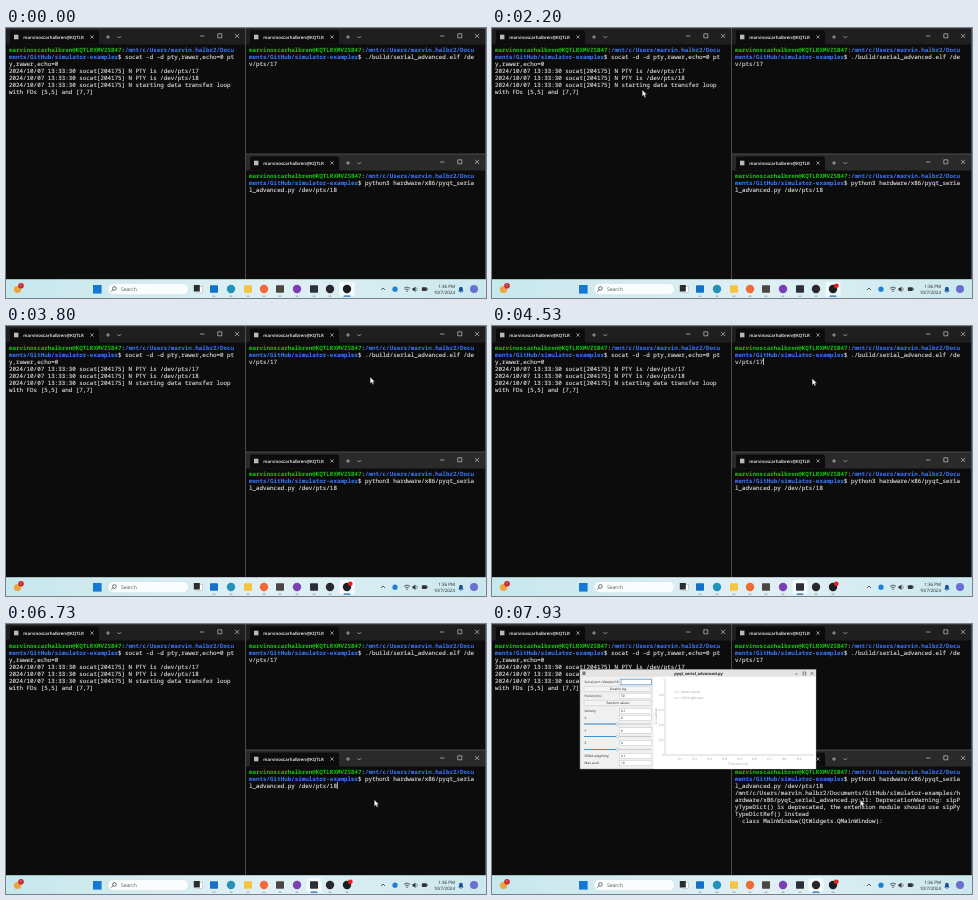
An HTML page that plays this animation: 480x270 px, repeating every 8 s.

```html
<!DOCTYPE html>
<html>
<head>
<meta charset="utf-8">
<style>
html, body { margin: 0; width: 100%; height: 100%; overflow: hidden; background: #0c0c0c; }
svg { display: block; width: 100vw; height: 100vh; }
text { white-space: pre; text-rendering: geometricPrecision; font-family: "Open Sans", sans-serif; }
.term { font: 500 5.86px "Noto Sans Mono", monospace; fill: #dedede; stroke: #dedede; stroke-width: .12; }
.user, .path { font-weight: 700; stroke: none; }
.user { fill: #16c60c; }
.path { fill: #3b78ff; }
.line { fill: none; stroke: #ddd; stroke-width: .6; }
</style>
</head>
<body>
<svg id="stage" viewBox="0 0 480 270"></svg>
<script>
const LOOP = 8000, CHAR = 3.516, ROW = 7;
const USER = 'marvinoscarhalbren@KQTLRXMVZSB47';
const HOME = '/mnt/c/Users/marvin.halbr2/Docu';

const rect = (x, y, w, h, fill, more = '') =>
  `<rect x="${x}" y="${y}" width="${w}" height="${h}" fill="${fill}" ${more}/>`;
const circle = (x, y, r, fill, more = '') =>
  `<circle cx="${x}" cy="${y}" r="${r}" fill="${fill}" ${more}/>`;
const label = (x, y, size, fill, str, more = '') =>
  `<text x="${x}" y="${y}" font-size="${size}" fill="${fill}" ${more}>${str}</text>`;
const stroke = (d, color, width = .6) =>
  `<path d="${d}" fill="none" stroke="${color}" stroke-width="${width}"/>`;
const group = (id, body) => `<g id="${id}">${body}</g>`;
const span = (cls, str) => `<tspan class="${cls}">${str}</tspan>`;

const rows = (lines, first = 0) => lines.map((line, i) =>
  `<text class="term" x="3" y="${23.7 + ROW * (first + i)}">${line}</text>`).join('');

const prompt = command => [
  span('user', USER) + ':' + span('path', HOME),
  span('path', 'ments/GitHub/simulator-examples') + '$ ' + command];

function terminal(x, y, height, barColor, lines, extra = '') {
  return `<g transform="translate(${x} ${y})">
    ${rect(0, 0, 240, height, '#0c0c0c')}
    ${rect(0, 0, 240, 16.5, barColor)}
    <path d="M2 16.5Q4 16.5 4 14.5V4.5Q4 2.5 6 2.5H91Q93 2.5 93 4.5V14.5Q93 16.5 95 16.5Z" fill="#0c0c0c"/>
    ${rect(8, 6.7, 4.4, 4.6, '#bbb')}
    ${label(17.3, 10.8, 4.4, '#fff', 'marvinoscarhalbren@KQTLR', 'font-weight="600"')}
    <path class="line" d="M84.4 7.4l3.2 3.2m0-3.2l-3.2 3.2M100 9h4m-2-2v4M111.5 8.2l1.8 1.8 1.8-1.8
      M194 8h4.4M211.8 5.8h4v4h-4zM229 5.8l4.2 4.2m0-4.2l-4.2 4.2"/>
    ${rows(lines)}${extra}
    ${stroke(`M0 0H240M239.5 0V${height}`, '#5a5a5a', .8)}
  </g>`;
}

function taskbar() {
  const apps = [[208, '#1272c9', 1], [225, '#2292b8'], [242, '#f5c542', 1], [258, '#f26a35'],
    [274, '#4a4642', 1], [291, '#7a3fb5'], [308, '#2b3036', 1], [324, '#29272a'], [341, '#1d1c20']];
  const appIcon = ([x, color, square]) =>
    (square ? rect(x - 4, 257.2, 8, 7.6, color, 'rx=".8"') : circle(x, 261, 4.2, color)) +
    rect(x - 1.5, 267.7, 3, .9, '#7e8b92', 'rx=".4"');
  const active = (id, x) => group(id,
    rect(x - 7.5, 254, 15, 14.5, '#f3fafc', 'rx="2"') +
    rect(x - 3.5, 267.6, 7, 1.2, '#0a70c4', 'rx=".6"'));
  return `<linearGradient id="sky">
      <stop stop-color="#c6e7ec"/><stop offset=".55" stop-color="#e0f0f5"/><stop offset="1" stop-color="#cbe8ee"/>
    </linearGradient>` +
    rect(0, 251.2, 480, 18.8, 'url(#sky)') +
    circle(11.5, 261.5, 3.6, '#eda43c') + circle(15, 257.8, 2.8, '#c8242c') +
    label(15, 259.4, 4, '#fff', '1', 'text-anchor="middle"') +
    rect(87, 257, 8.6, 8.6, '#1479d4') +
    rect(102, 255.5, 80.5, 11.2, '#fafdfe', 'rx="5.6" stroke="#c3d3da" stroke-width=".4"') +
    circle(108.4, 260.4, 1.8, 'none', 'stroke="#333" stroke-width=".7"') +
    stroke('M107 261.8l-1.8 1.8', '#333', .7) + label(115, 262.8, 5, '#555', 'Search') +
    rect(190, 258.5, 6.5, 6, '#fff', 'stroke="#999" stroke-width=".4"') + rect(187.8, 257, 6, 6.5, '#2c2c2c') +
    active('atRecorder', 341) + active('atTerminal', 308) + active('atLinux', 324) +
    apps.map(appIcon).join('') +
    circle(344.3, 257.8, 2.4, '#e02424', 'id="recording"') +
    stroke('M375 262l2 -2 2 2', '#222', .7) + circle(389, 261.2, 2.6, '#1b7fd6') +
    stroke('M398 260.3q3-2.6 6 0M399.3 261.8q1.7-1.4 3.4 0', '#222', .7) + circle(401, 263.2, .6, '#222') +
    '<path d="M406.5 260h1.3l1.7-1.5v5.4l-1.7-1.5h-1.3z" fill="#333"/>' +
    stroke('M410.6 259.6q1.3 1.6 0 3.2', '#333', .5) +
    rect(415.8, 259.3, 5, 3.6, '#333', 'rx=".7"') + rect(421, 260.3, .7, 1.6, '#333') +
    label(449, 259.6, 4.5, '#222', '1:36 PM', 'text-anchor="end"') +
    label(449, 266, 4.5, '#222', '10/7/2024', 'text-anchor="end"') +
    '<path d="M452.2 263.4l.9-1.4v-1.5a1.8 1.8 0 0 1 3.6 0v1.5l.9 1.4zM454 264h1.8l-.9.9z" fill="#174f9c"/>' +
    circle(468, 261, 4, '#6b6fd0');
}

function plotWindow() {
  const field = (y, name, value) => label(92.5, y + 1.1, 3.2, '#222', name) +
    rect(127.5, y - 2.8, 32, 5.6, '#fff', 'stroke="#b5b5b5" stroke-width=".4"') +
    label(129, y + 1.1, 3.2, '#222', value);
  const button = (y, name) =>
    rect(92, y - 2.7, 67.5, 5.4, '#f4f4f4', 'stroke="#b5b5b5" stroke-width=".4" rx=".6"') +
    label(126, y + 1.1, 3.2, '#222', name, 'text-anchor="middle"');
  const slider = y => rect(92, y - .6, 67.5, 1.2, '#c9c9c9', 'rx=".6"') +
    rect(92, y - .6, 33, 1.2, '#3a94d6', 'rx=".6"') + circle(125.5, y, 1.5, '#f8f8f8', 'stroke="#999" stroke-width=".4"');
  const gray = '#969696';
  const ticks = Array.from({ length: 9 }, (_, i) =>
    label(173 + 14.9 * (i + 1), 136.2, 3.2, gray, `0.${i + 1}`, 'text-anchor="middle"')).join('') +
    [0, 0.2, 0.4, 0.6, 0.8, 1].map(v =>
      label(171.5, 132 - 75 * v, 3.2, gray, v, 'text-anchor="end"')).join('');
  return rect(88, 45.5, 236, 99.5, '#f0f0f0', 'stroke="#8a8a8a" stroke-width=".5"') +
    rect(88.3, 45.8, 235.4, 7, '#e4e4e4') + rect(90.5, 47.5, 3, 3.6, '#777') +
    label(206.5, 50.8, 4, '#222', 'pyqt_serial_advanced.py', 'text-anchor="middle" font-weight="700"') +
    stroke('M303 50h2.6M311 48h2.8v2.8h-2.8zM318.6 48l2.8 2.8m0-2.8l-2.8 2.8', '#333', .5) +
    rect(161.5, 52.8, 162.2, 92, '#fff') +
    field(58, 'Serial port: /dev/pts/18', '') +
    rect(129, 55.2, 30.5, 5.6, '#fff', 'stroke="#3584c8" stroke-width=".6"') +
    button(65, 'Disable log') + field(72, 'Period (ms)', '50') + button(79, 'Random values') +
    field(87, 'Velocity', '0.1') + field(94, 'X', '0') + slider(100) +
    field(106.5, 'Y', '0') + slider(112.5) + field(119, 'Z', '0') + slider(125.5) +
    field(132, 'DSMA weighting', '0.1') + field(139, 'Max accel', '10') +
    stroke('M173 55V131H322', gray, .4) + ticks +
    stroke('M182 68h5', '#d99a9a', .5) + stroke('M182 74h5', '#9aa8d9', .5) +
    label(189, 69.1, 3.2, gray, 'Motor speed') + label(189, 75.1, 3.2, gray, 'LED brightness') +
    label(246, 141, 3.2, gray, 'Time (est ms)', 'text-anchor="middle"') +
    label(0, 0, 3.2, gray, 'G readings', 'text-anchor="middle" transform="translate(165 92) rotate(-90)"');
}

const warning = [
  HOME + 'ments/GitHub/simulator-examples/h',
  'ardware/x86/pyqt_serial_advanced.py:11: DeprecationWarning: sipP',
  'yTypeDict() is deprecated, the extension module should use sipPy',
  'TypeDictRef() instead',
  '  class MainWindow(QtWidgets.QMainWindow):'];

const stage = document.getElementById('stage');
stage.innerHTML =
  terminal(0, 0, 251.5, '#1f1f1f', [...prompt('socat -d -d pty,rawer,echo=0 pt'), 'y,rawer,echo=0',
    '2024/10/07 13:33:30 socat[204175] N PTY is /dev/pts/17',
    '2024/10/07 13:33:30 socat[204175] N PTY is /dev/pts/18',
    '2024/10/07 13:33:30 socat[204175] N starting data transfer loop',
    'with FDs [5,5] and [7,7]']) +
  terminal(240, 0, 126, '#1f1f1f', [...prompt('./build/serial_advanced.elf /de'), 'v/pts/17']) +
  terminal(240, 126, 125.5, '#2a2a2a',
    [...prompt('python3 hardware/x86/pyqt_seria'), 'l_advanced.py /dev/pts/18'],
    group('warning', rows(warning, 3))) +
  rect(0, 0, .7, 7, '#fff', 'id="caret"') +
  taskbar() + group('plot', plotWindow()) +
  '<path id="pointer" d="M0 0V6.4L1.5 5.1L2.6 7.5L3.7 7L2.6 4.7H4.6Z" fill="#fff" stroke="#222" stroke-width=".35"/>';

const el = id => document.getElementById(id);
const show = (id, on) => el(id).setAttribute('visibility', on ? 'visible' : 'hidden');
const move = (id, x, y) => el(id).setAttribute('transform', `translate(${x} ${y})`);

// time, x, y of the pointer
const route = [[1000, 470, 247], [1200, 270, 225], [1400, 103.7, 179.3], [1500, 63, 128], [1600, 74.5, 102.5],
  [1870, 74.5, 102.5], [2200, 150, 62], [2450, 206, 38], [2670, 196, 43], [2930, 200.4, 51.5],
  [3130, 150, 47], [3330, 280, 60], [3530, 403, 65], [3900, 350, 46], [4200, 326, 50], [4530, 320.2, 52.6],
  [4930, 315, 55], [5870, 315, 55], [6250, 340, 120], [6600, 368.3, 175.8], [8000, 368.3, 175.8]];

function pointerAt(t) {
  const i = Math.max(1, route.findIndex(p => p[0] > t));
  const [t0, x0, y0] = route[i - 1], [t1, x1, y1] = route[i];
  const k = (t - t0) / (t1 - t0);
  return [x0 + (x1 - x0) * k, y0 + (y1 - y0) * k];
}

// time, top of terminal, row, column; each entry restarts the blink
const carets = [[4200, 0, 2, 8], [5260, 0, 3, 0], [6500, 126, 2, 25], [7190, 126, 3, 0], [7530, 126, 8, 0]];
const FOCUS_PLOT = 7800, BLINK = 530;

function draw(t) {
  const between = (a, b) => t >= a && t < b;
  show('recording', t >= 140);
  show('atRecorder', t < 4200);
  show('atTerminal', between(4200, FOCUS_PLOT));
  show('atLinux', t >= FOCUS_PLOT);
  show('warning', t >= 7530);
  show('plot', t >= FOCUS_PLOT);

  const caret = carets.filter(c => c[0] <= t).pop();
  show('caret', caret && t < FOCUS_PLOT && (t - caret[0]) % (2 * BLINK) < BLINK);
  if (caret) move('caret', 243 + caret[3] * CHAR, caret[1] + 18 + caret[2] * ROW);

  show('pointer', t >= 1000 && !between(5260, 5660) && !between(7190, FOCUS_PLOT));
  if (t >= 1000) move('pointer', ...pointerAt(t));
}

function tick() {
  draw(performance.now() % LOOP);
  requestAnimationFrame(tick);
}
tick();
</script>
</body>
</html>
```
